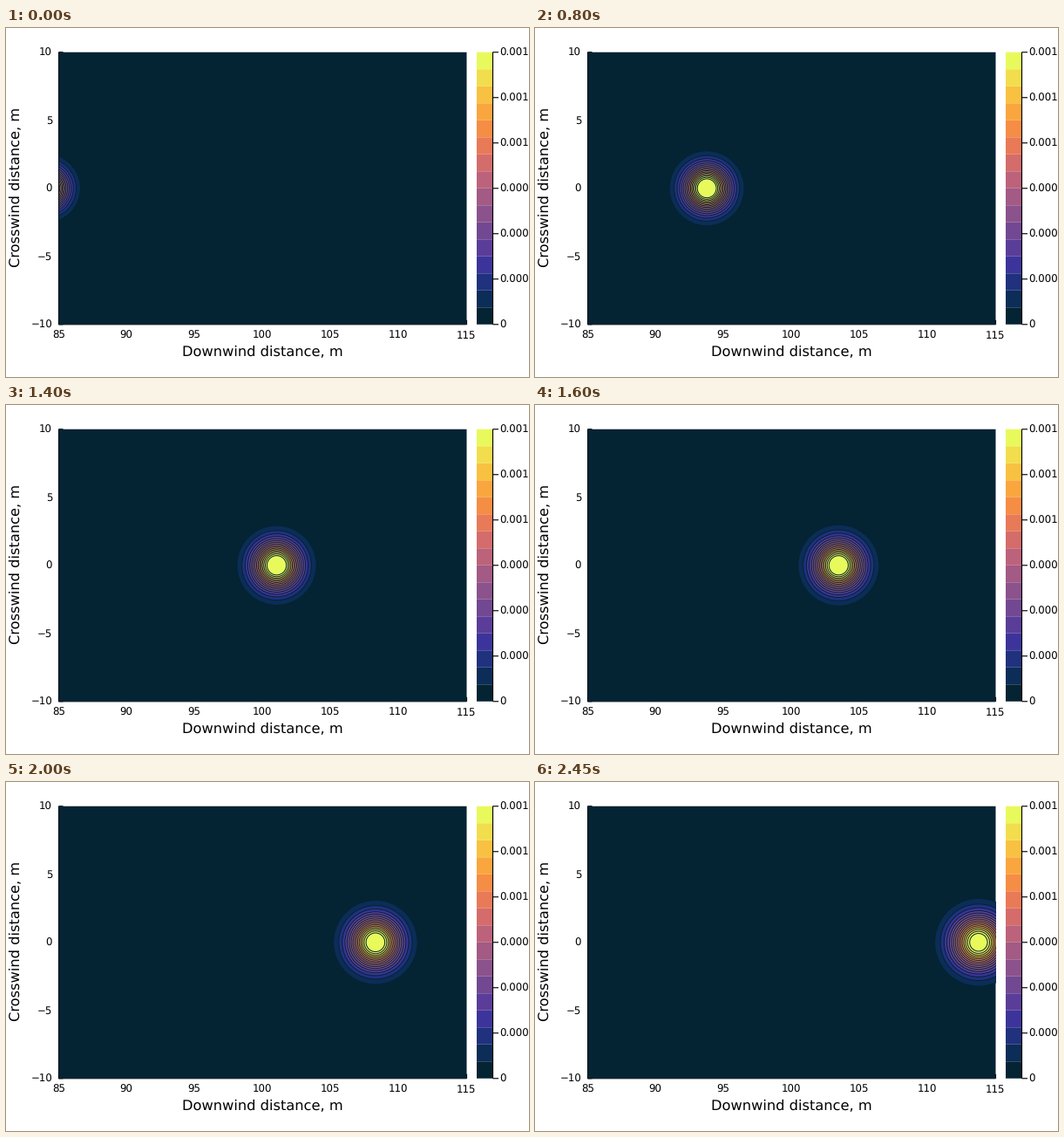
Write a matplotlib script that moves like this. It is 600 px wide and 400 px high and loops after 2.5 s.

```python
import numpy as np
import matplotlib.pyplot as plt
from matplotlib.animation import FuncAnimation
from matplotlib.patches import Circle, Rectangle

W, H, DPI = 600, 400, 100
FRAMES, STEP_MS = 50, 50
LEFT, RIGHT, TOP, BOTTOM = 60.5, 528.5, 27.75, 339.75
SCALE = 15.6  # pixels per metre
BANDS = 16

plt.rcParams["font.family"] = "DejaVu Sans"
plt.rcParams["text.hinting"] = "none"


def pt(px):
    return px * 72 / DPI


def thermal(n):
    """Sample n evenly spaced colours of the thermal colour map."""
    stops = np.array([
        (4, 35, 51), (13, 48, 100), (53, 50, 155), (93, 62, 153),
        (126, 77, 143), (158, 89, 135), (193, 100, 121), (225, 113, 97),
        (246, 139, 69), (251, 173, 60), (246, 211, 70), (232, 250, 91)]) / 255
    at = np.linspace(0, len(stops) - 1, n)
    return np.stack([np.interp(at, range(len(stops)), c) for c in stops.T], 1)


colors = thermal(BANDS)

fig = plt.figure(figsize=(W / DPI, H / DPI), dpi=DPI, facecolor="white")
ax = fig.add_axes([0, 0, 1, 1])
ax.set_xlim(0, W)
ax.set_ylim(H, 0)
ax.axis("off")


def line(x0, y0, x1, y1, z=1):
    ax.plot([x0, x1], [y0, y1], color="black", lw=pt(1.15), zorder=z,
            solid_capstyle="butt", snap=False)


def box(x, y, w, h, color):
    patch = Rectangle((x, y), w, h, fc=color, ec="none", zorder=2, snap=False)
    return ax.add_patch(patch)


def label(x, y, text, px=11.7, **kw):
    ax.text(x, y, text, fontsize=pt(px), color="black", va="baseline", **kw)


# The field covers the axes, so only their outer edges show
field = box(LEFT, TOP, RIGHT - LEFT, BOTTOM - TOP, colors[0])
line(LEFT, TOP, LEFT, BOTTOM)
line(LEFT, BOTTOM, RIGHT, BOTTOM)
for v in range(85, 116, 5):
    x = LEFT + (v - 85) * SCALE
    line(x, BOTTOM, x, BOTTOM - 5)
    label(x - 0.3, 355.5, str(v), ha="center")
for v in range(-10, 11, 5):
    y = TOP + (10 - v) * SCALE
    line(LEFT, y, LEFT + 5, y)
    label(53.1, y + 4.4, str(v).replace("-", "\u2212"), ha="right")
label(294, 376, "Downwind distance, m", 16.3, ha="center")
label(16.2, 182.8, "Crosswind distance, m", 16.3, rotation=90,
      rotation_mode="anchor", ha="center")

# Colour bar
band_h = (BOTTOM - TOP) / BANDS
for i, color in enumerate(colors):
    box(540, BOTTOM - (i + 1) * band_h, 18, band_h, color)
line(558.5, TOP, 558.5, BOTTOM, z=5)
for i in range(7):
    y = BOTTOM - i * (BOTTOM - TOP) / 6
    line(558.5, y, 565, y, z=5)
    text = "0" if i == 0 else f"{int(i * 0.25) / 1000:.3f}"
    label(565.9, y + 4.4, text)

# One filled disc per contour level, outermost first
discs = []
for k in range(1, BANDS + 1):
    disc = Circle((0, 0), 1, fc=colors[min(k, BANDS - 1)], ec=colors[0],
                  lw=pt(1), zorder=2 + k / 100)
    ax.add_patch(disc)
    disc.set_clip_path(field)
    discs.append(disc)


def update(n):
    """Move the Gaussian puff downwind while it spreads."""
    x = 46 + 9.446 * n
    outer = 39.4 + 0.2213 * n
    inner = 11.1 - 0.0019 * (n - 27) ** 2
    two_var = (outer ** 2 - inner ** 2) / np.log(BANDS)
    for k, disc in enumerate(discs, 1):
        disc.center = (x, (TOP + BOTTOM) / 2)
        disc.radius = np.sqrt(inner ** 2 + two_var * np.log(BANDS / k))
    return discs


anim = FuncAnimation(fig, update, frames=FRAMES, interval=STEP_MS,
                     repeat=True, repeat_delay=0)
plt.show()
```
